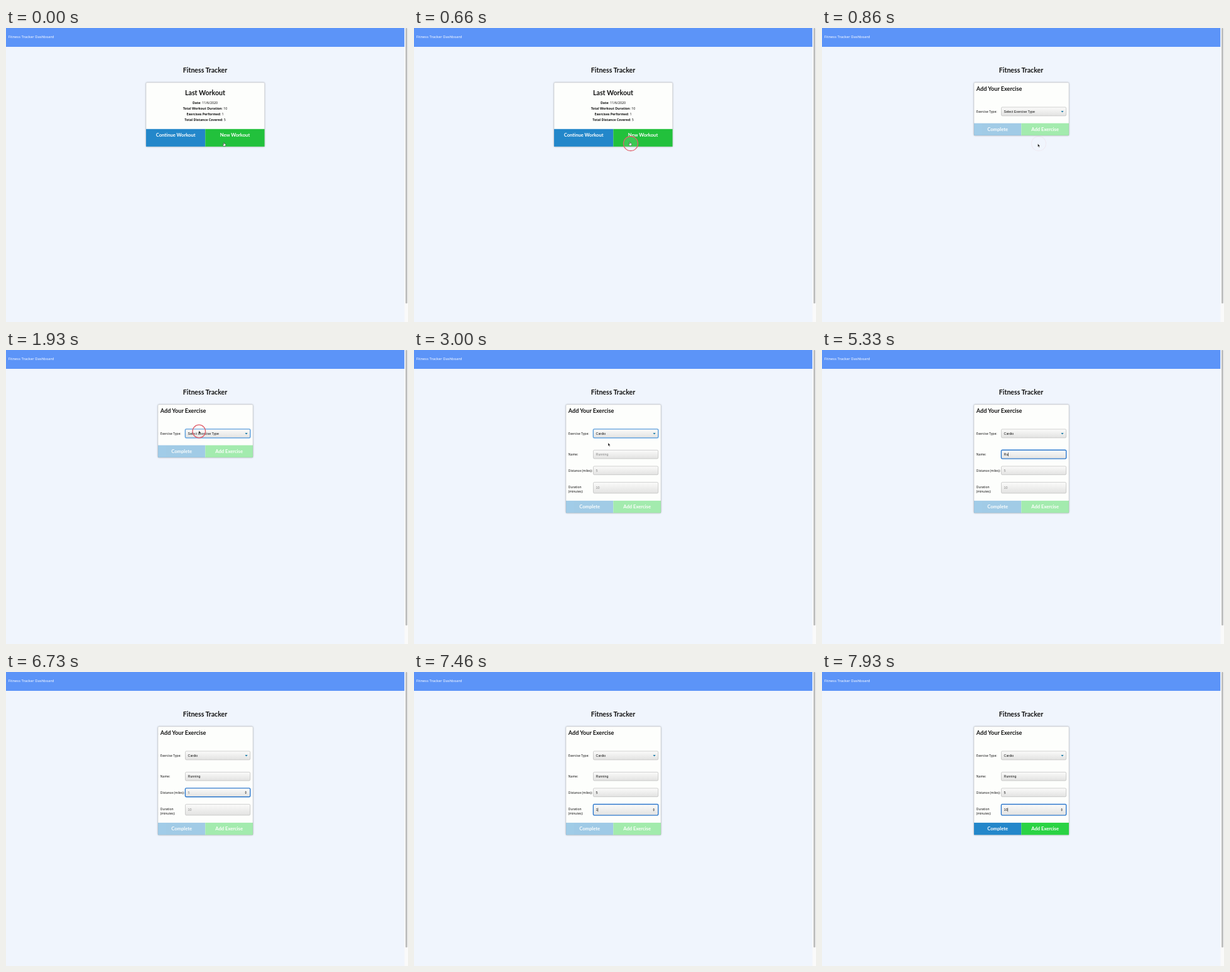
An HTML page that plays this animation: 640x468 px, repeating every 8000 ms.

```html
<!DOCTYPE html>
<html lang="en">
<head>
<meta charset="utf-8">
<title>Fitness Tracker</title>
<style>
  html, body { margin: 0; width: 100%; height: 100%; overflow: hidden; background: #f0f5fd; }
  svg { display: block; width: 640px; height: 468px; }
  text { font-family: "Noto Sans", "Open Sans", sans-serif; font-size: 5px; fill: #111; }
  .head { font: 700 10.6px Lato, sans-serif; }
  .sub { font-size: 9.1px; }
  .btn { font: 700 7.6px Lato, sans-serif; fill: #fff; }
  .field { font: 5.3px "Liberation Sans", Arial, sans-serif; }
  .mid { text-anchor: middle; }
  .stat { font-size: 5.25px; }
  .card { fill: #fdfefc; stroke: #d0d3d6; stroke-width: .5; filter: drop-shadow(0 .5px .8px #0005); }
  tspan { font-weight: 700; }
</style>
</head>
<body>
<svg id="stage" viewBox="0 0 640 468"></svg>
<script>
const LOOP = 8000;
const GROW = 88.3;
const BLUE = '#2387ca', GREEN = '#2ad344';

const text = (x, y, s, cls = '', extra = '') =>
  `<text x="${x}" y="${y}" class="${cls}" ${extra}>${s}</text>`;
const rect = (x, y, w, h, fill, extra = '') =>
  `<rect x="${x}" y="${y}" width="${w}" height="${h}" fill="${fill}" ${extra}/>`;

const stat = (y, name, value) =>
  text(317, y, `<tspan>${name}</tspan>: ${value}`, 'mid stat');

const button = (x, y, w, h, fill, label, labelY) =>
  rect(x, y, w, h, fill) + text(x + w / 2, labelY, label, 'mid btn');

const field = (id, y, h) => `
  ${rect(285.4, y - 0.1, 103.4, h + 0.2, 'none', `id="${id}Glow" rx="2" stroke="#a9d0f4" stroke-width="2"`)}
  ${rect(285.5, y, 103.2, h, 'url(#face)', `id="${id}Box" rx="1.7"`)}
  ${text(289.6, y + h / 2 + 1.9, '', 'field', `id="${id}Text"`)}`;

const spinner = (id, y) =>
  `<path id="${id}Spin" fill="#444" d="M380.3 ${y - .5}l1.4-1.7 1.4 1.7zM380.3 ${y + .5}l1.4 1.7 1.4-1.7z"/>`;

document.getElementById('stage').innerHTML = `
  <defs>
    <linearGradient id="face" x2="0" y2="1">
      <stop offset="0" stop-color="#fbfbfa"/><stop offset="1" stop-color="#e2e2e1"/>
    </linearGradient>
  </defs>
  ${rect(0, 0, 640, 468, '#f0f5fd')}
  ${rect(0, 0, 634.5, 30, '#5c94f8')}
  ${rect(634.5, 0, 5.5, 468, '#fafafa')}
  ${rect(636, 0, 3, 438.5, '#bfc0bf', 'rx="1.3"')}
  ${text(3.8, 15.8, 'Fitness Tracker Dashboard', '', 'style="font-size:5.85px;fill:#fff"')}
  ${text(317, 71, 'Fitness Tracker', 'mid head')}

  <g id="home">
    ${rect(223, 87, 188.6, 101.8, '#fff', 'rx="1.5" class="card"')}
    ${text(317, 107, 'Last Workout', 'mid head')}
    ${stat(120.6, 'Date', '11/6/2020')}
    ${stat(129.7, 'Total Workout Duration', 10)}
    ${stat(138.7, 'Exercises Performed', 1)}
    ${stat(147.8, 'Total Distance Covered', 5)}
    ${button(223, 160.8, 94.3, 28, BLUE, 'Continue Workout', 173.3)}
    ${button(317.3, 160.8, 94.3, 28, '#22c13c', 'New Workout', 173.3)}
  </g>

  <g id="form">
    ${rect(242, 87, 151, 84, '#fff', 'id="card" rx="1.5" class="card"')}
    ${text(245.8, 99.6, 'Add Your Exercise', 'head sub')}
    ${text(245.8, 135, 'Exercise Type:')}
    ${field('type', 126, 13.8)}
    <path d="M380.5 132h4.2l-2.1 2.5z" fill="#1c7ba8"/>
    <g id="cardio">
      ${text(245.8, 168.3, 'Name:')}
      ${text(245.8, 193.7, 'Distance (miles):')}
      ${text(245.8, 219.7, 'Duration')}
      ${text(245.8, 226.7, '(minutes):')}
      ${field('name', 159.4, 13.6)}
      ${field('dist', 185, 13.6)}${spinner('dist', 191.8)}
      ${field('time', 210.6, 17.4)}${spinner('time', 219.3)}
    </g>
    <g id="foot">
      ${button(242, 151.6, 75.3, 19.4, BLUE, 'Complete', 164.2)}
      ${button(317.3, 151.6, 75.7, 19.4, GREEN, 'Add Exercise', 164.2)}
    </g>
    ${rect(0, 0, .6, 6, '#111', 'id="caret"')}
  </g>

  <circle id="ring" fill="#fff" fill-opacity=".12" stroke="#e0606c" stroke-width="1.3"/>
  <g id="pointer">
    <path id="arrow" d="M0 0v5l1.2-1 .9 1.9 .9-.4-.9-1.8h1.6z" fill="#111" stroke="#fff" stroke-width=".4"/>
    <path id="hand" d="M-.6-2.6q.6-.6 1.1 0v1.7l2 .6q.5.3.3 1.3l-.5 2h-3l-1.7-2.4q.1-.9 1.8.3z" fill="#fff" stroke="#222" stroke-width=".5"/>
    <path id="beam" d="M-1-2.6h2M0-2.6v5.2M-1 2.6h2" fill="none" stroke="#555" stroke-width=".5"/>
  </g>`;

const el = id => document.getElementById(id);
const show = (id, on) => el(id).setAttribute('visibility', on ? 'inherit' : 'hidden');
const set = (id, attrs) => {
  for (const k in attrs) el(id).setAttribute(k, attrs[k]);
};

// [time, x, y]
const path = [
  [0, 347, 185], [60, 347, 185], [460, 344, 184], [860, 343.5, 184.3],
  [1000, 343, 184], [1400, 319, 152], [1460, 319, 152], [1860, 307, 128.5],
  [2999, 307, 128.5], [3000, 309, 147.8], [3200, 309, 147.8],
  [3800, 311, 161], [LOOP, 311, 161]
];
// [time, x, y, radius]
const clicks = [[600, 345, 184, 11.5], [1860, 307.3, 129.5, 10.3], [3860, 311.3, 161.3, 12]];
const keys = {
  name: [4860, 5260, 5400, 5660, 5800, 6000, 6060],
  dist: [6930],
  time: [7460, 7660]
};
const words = { name: 'Running', dist: '5', time: '10' };
// [time, focused field]
const focus = [[0, ''], [1860, 'type'], [3860, 'name'], [6200, 'dist'], [7200, 'time']];
const caretOff = [[4400, 4860], [6730, 6930]];

const OPEN = 740, CARDIO = 3000, VALID = 7460;
const smooth = p => p * p * (3 - 2 * p);
const clamp = p => Math.min(1, Math.max(0, p));

function position(t) {
  const i = path.findIndex(p => p[0] > t);
  const [t0, x0, y0] = path[i - 1], [t1, x1, y1] = path[i];
  const p = smooth((t - t0) / (t1 - t0));
  return t1 - t0 > 1100 ? [x0, y0] : [x0 + (x1 - x0) * p, y0 + (y1 - y0) * p];
}

function drawField(id, value, hint, focused) {
  const isSelect = id === 'type';
  show(id + 'Glow', focused);
  set(id + 'Box', {
    stroke: focused ? (isSelect ? '#5a9bd8' : '#2470c8') : '#b2b2b2',
    'stroke-width': focused ? 1.1 : .6
  });
  el(id + 'Text').textContent = value || hint;
  el(id + 'Text').style.fill = value ? '#111' : '#858585';
}

function draw(t) {
  const active = focus.filter(f => f[0] <= t).pop()[1];
  const expanded = t >= CARDIO;
  show('home', t < OPEN);
  show('form', t >= OPEN);
  show('cardio', expanded);
  set('card', { height: 84 + (expanded ? GROW : 0) });
  set('foot', {
    transform: `translate(0 ${expanded ? GROW : 0})`,
    opacity: .42 + .58 * clamp((t - VALID) / 100)
  });

  drawField('type', expanded ? 'Cardio' : 'Select Exercise Type', '', active === 'type');
  for (const id in keys) {
    const typed = words[id].slice(0, keys[id].filter(k => k <= t).length);
    drawField(id, typed, words[id], active === id);
    if (id !== 'name') show(id + 'Spin', active === id);
    if (active === id) {
      const label = el(id + 'Text');
      const width = typed ? label.getComputedTextLength() : 0;
      set('caret', { x: 289.6 + width, y: label.getAttribute('y') - 4.9 });
    }
  }
  show('caret', active in keys && !caretOff.some(([a, b]) => t >= a && t < b));

  const [x, y] = position(t);
  set('pointer', { transform: `translate(${x} ${y})` });
  show('pointer', t < 4400);
  show('hand', t < OPEN);
  show('arrow', t >= OPEN && t < 3600);
  show('beam', t >= 3600);

  const hit = clicks.find(c => t >= c[0] && t < c[0] + 270);
  show('ring', hit);
  if (hit) {
    const [start, cx, cy, r] = hit;
    set('ring', { cx, cy, r, opacity: 1 - clamp((t - start - 130) / 140) });
  }
}

function tick() {
  draw(performance.now() % LOOP);
  requestAnimationFrame(tick);
}
tick();
</script>
</body>
</html>
```
